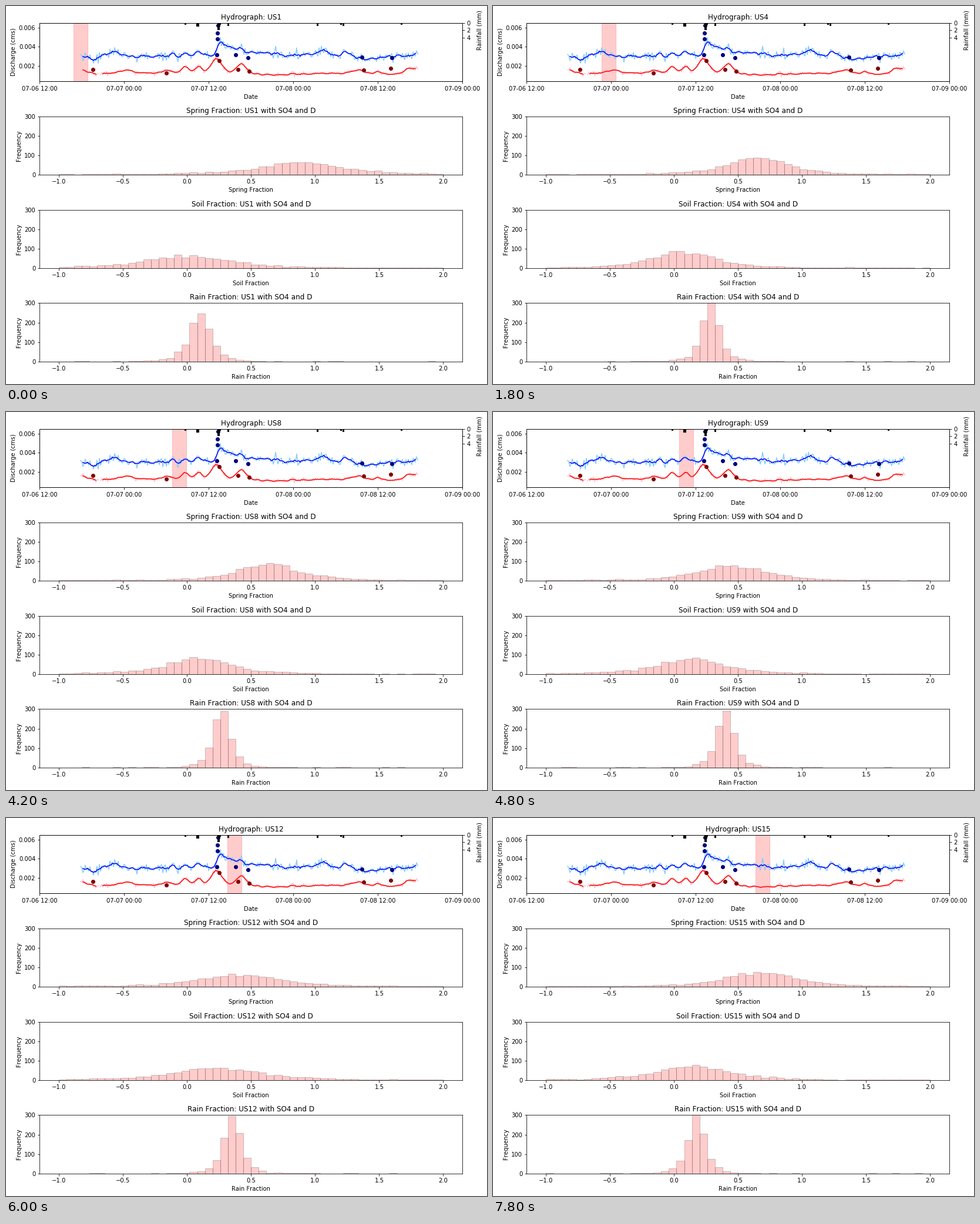
A matplotlib script for the animation above (8000 ms loop, 819x643 px).

```python
import numpy as np
import matplotlib.pyplot as plt
from matplotlib.animation import FuncAnimation

W, H, DPI = 819, 643, 72
LEFT, WIDTH, HEIGHT = 57.2, 720, 99.4
STEP_MS, HOLD, FRAMES = 200, 3, 40

plt.rcdefaults()
plt.rcParams["font.family"] = "DejaVu Sans"
plt.rcParams["text.kerning_factor"] = 6

# Flow events in px: centre, rise, left width, right width
BLUE_EVENTS = [(147, -6, 9, 9), (186, 5, 11, 11), (217, -3, 8, 8),
               (325, 9, 4, 9), (364, 23, 4, 22), (430, 5, 35, 35),
               (538, 7, 14, 14), (577, 6, 9, 9), (609, -5, 14, 14),
               (697, 4, 6, 6)]
RED_EVENTS = [(131, 6, 5, 5), (206, 6, 7, 7), (275, 4, 9, 9), (306, 13, 6, 6),
              (328, 14, 5, 5), (358, 25, 9, 9), (400, 17, 8, 8),
              (470, -3, 30, 30), (600, 5, 8, 8), (686, 8, 6, 20)]
BLUE_DOTS = [(361, 33), (360, 46), (360.5, 56), (359, 83), (391, 83),
             (412, 88), (606, 87), (657, 88)]
RED_DOTS = [(148, 108), (273, 114), (363, 93), (395, 108), (414, 111),
            (609, 109), (655, 106)]
# Rain bars in px: centre, width, depth
RAIN = [(305.5, 3, 3), (326.5, 5, 6), (362, 4, 12), (364.5, 3, 3),
        (378.5, 3, 5), (530.5, 3, 5), (570.5, 3, 3), (574.5, 3, 5),
        (673.5, 3, 3)]

SITES = [n for n in range(1, 16) if n != 10]
# State, window start px, soil mode, rain mode, soil spread, rain spread
KEYS = np.array([
    (0, 115.2, 0.01, 0.105, 0.60, 0.145),
    (3, 185.2, 0.07, 0.285, 0.43, 0.122),
    (5, 235.2, 0.18, 0.175, 0.55, 0.122),
    (7, 283.2, 0.09, 0.270, 0.44, 0.122),
    (9, 351.2, 0.18, 0.535, 0.52, 0.115),
    (11, 402.3, 0.28, 0.173, 0.68, 0.118),
    (13, 447.2, 0.15, 0.175, 0.49, 0.118),
])
SAMPLES, BIN = 950, 0.06
EDGES = -1 + BIN * np.arange(50)
CENTERS = EDGES + BIN / 2


def hours(x):
    return (np.asarray(x, float) - LEFT) / 12


def cms(y):
    return 0.002 + (101.5 - np.asarray(y, float)) / 16100


def plot_flow(ax, base, events, spread, seed, colors, gap=None):
    """Noisy readings every 10 minutes and their rolling mean of five."""
    x = np.arange(127, 702, 2)
    y = base + np.random.default_rng(seed).normal(0, spread, len(x))
    for center, rise, left, right in events:
        width = np.where(x < center, left, right)
        y -= rise * np.exp(-0.5 * ((x - center) / width) ** 2)
    y[x == gap] = np.nan
    ax.plot(hours(x), cms(y), color=colors[0])
    mean = sum(y[k:len(y) - 4 + k] for k in range(5)) / 5
    ax.plot(hours(x[2:-2]), cms(mean), color=colors[1])


def counts(mode, spread, floor, seed):
    """Heavy-tailed bell of a fixed sample size, plus sampling noise."""
    peak = SAMPLES * BIN / (spread * np.pi / 2)
    c = peak / (1 + ((CENTERS - mode) / spread) ** 2) ** 2 + floor
    noise = np.random.default_rng(seed).normal(0, 0.5, len(c))
    return np.maximum(0, np.round(c + noise * np.sqrt(c)))


def fractions(state):
    """Mode and spread of each fraction; the three modes add up to one."""
    soil, rain, wide, narrow = (np.interp(state, KEYS[:, 0], col)
                                for col in KEYS.T[2:])
    return {"Spring": (1 - soil - rain, wide, 2),
            "Soil": (soil, wide, 2),
            "Rain": (rain, narrow, 1)}


fig = plt.figure(figsize=(W / DPI, (H + 1e-3) / DPI), dpi=DPI, facecolor="white")


def panel(row):
    bottom = H - (128.3 + 158.85 * row)
    return fig.add_axes([LEFT / W, bottom / H, WIDTH / W, HEIGHT / H])


# Hydrograph
top = panel(0)
plot_flow(top, 84.5, BLUE_EVENTS, 4.2, 4, ("lightskyblue", "blue"))
plot_flow(top, 114, RED_EVENTS, 1.9, 9, ("pink", "red"), gap=159)
for dots, color in ((BLUE_DOTS, "navy"), (RED_DOTS, "maroon")):
    dx, dy = zip(*dots)
    top.plot(hours(dx), cms(dy), "o", color=color)
top.set_xlim(0, 60)
top.set_ylim(0.00035, 0.0065)
top.set_yticks([0.002, 0.004, 0.006])
top.set_xticks(range(0, 61, 12))
top.set_xticklabels(["07-%02d %02d:00" % (6 + h // 24, h % 24)
                     for h in range(12, 73, 12)])
top.tick_params(axis="x", pad=4.5)
top.set_xlabel("Date")
top.set_ylabel("Discharge (cms)")
top_title = top.set_title("")
window = top.axvspan(0, 2, color="red", alpha=0.2)

rain_ax = top.twinx()
rx, rw, rd = np.array(RAIN).T
rain_ax.bar(hours(rx), rd * 16 / HEIGHT, width=rw / 12, color="black")
rain_ax.set_ylim(16, 0)
rain_ax.set_yticks([0, 2, 4])
fig.text(806.5 / W, 1 - 41.5 / H, "Rainfall (mm)", rotation=90,
         ha="center", va="center")

# Histograms
hists = {}
for row, kind in enumerate(("Spring", "Soil", "Rain"), 1):
    ax = panel(row)
    bars = ax.bar(EDGES, np.zeros(len(EDGES)), BIN, align="edge",
                  color="red", edgecolor="black", alpha=0.2)
    ax.set_xlim(-1.15, 2.15)
    ax.set_ylim(0, 300)
    ax.set_xticks(np.arange(-1, 2.1, 0.5))
    ax.set_yticks([0, 100, 200, 300])
    ax.set_xlabel(kind + " Fraction")
    ax.set_ylabel("Frequency")
    hists[kind] = bars, ax.set_title("")


def update(frame):
    state = frame // HOLD
    site = "US%d" % SITES[state]
    top_title.set_text("Hydrograph: " + site)
    window.set_x(hours(np.interp(state, KEYS[:, 0], KEYS[:, 1])))
    for kind, shape in fractions(state).items():
        bars, title = hists[kind]
        title.set_text("%s Fraction: %s with SO4 and D" % (kind, site))
        for bar, n in zip(bars, counts(*shape, 100 * state + len(kind))):
            bar.set_height(n)
    return []


anim = FuncAnimation(fig, update, frames=FRAMES, interval=STEP_MS,
                     init_func=lambda: update(0), repeat=True, repeat_delay=0)
plt.show()
```
